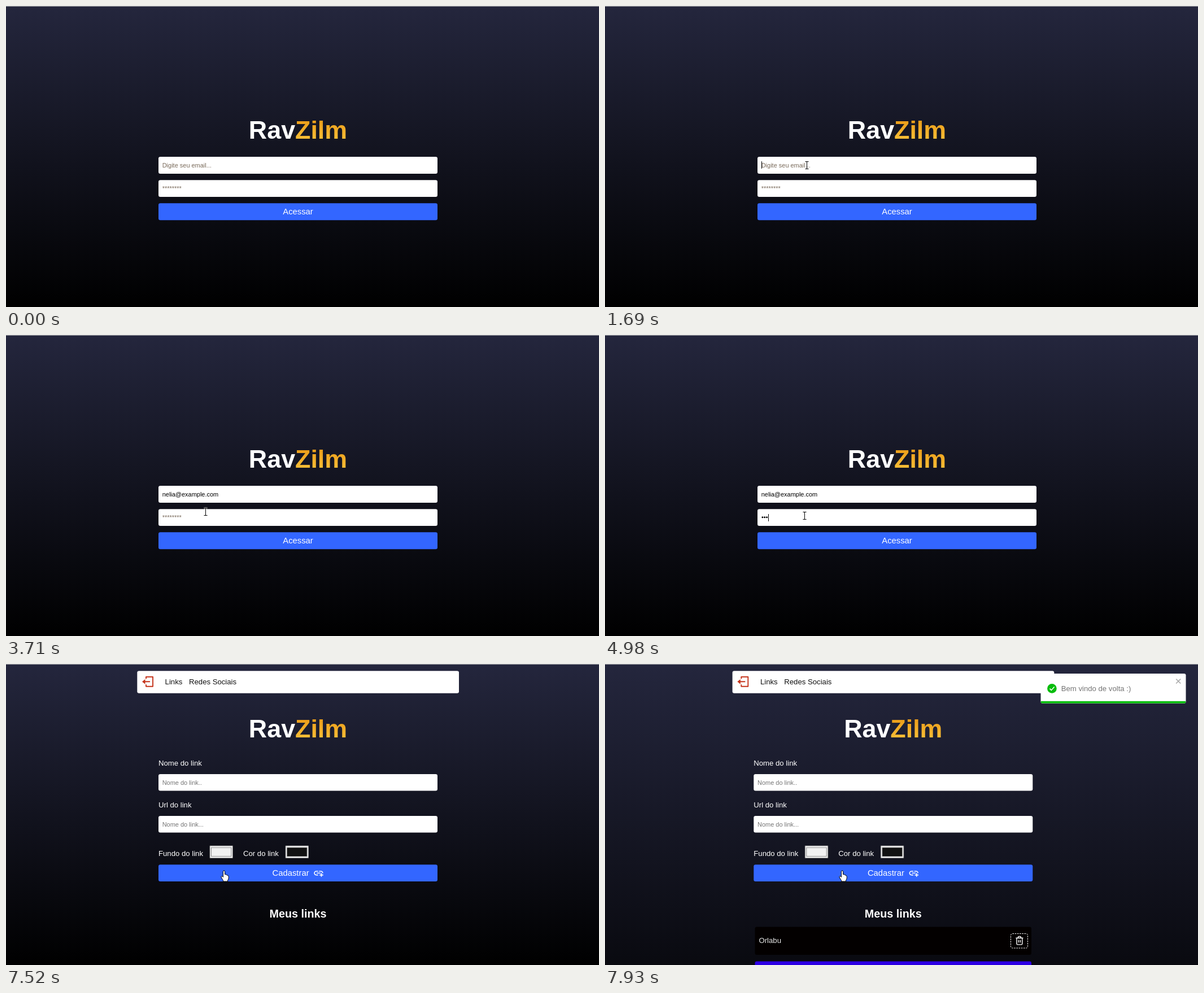
An HTML page with a canvas that plays this animation: 1050 by 533 pixels, repeating every 8 s.

```html
<!DOCTYPE html>
<html lang="pt-BR">
<head>
<meta charset="utf-8">
<title>RavZilm</title>
<style>
html, body { margin: 0; width: 100%; height: 100%; overflow: hidden; background: #000; }
canvas { display: block; }
</style>
</head>
<body>
<canvas id="stage" width="1050" height="533"></canvas>
<script>
const ctx = document.getElementById('stage').getContext('2d');
const W = 1050, H = 533, LOOP = 8000, STEP = 68;
const FAMILY = '"Liberation Sans", Arial, sans-serif';
const SMALL = 10.97, BODY = 13.17, BUTTON = 14.8;
const EMAIL = 'nelia@example.com';

// Pointer tracks: [ms, x, y], held between screen refreshes
const TRACKS = [
  [[200, 1001, 521], [400, 760, 450], [600, 560, 385], [750, 455, 347],
   [880, 399, 324], [950, 376, 308], [1020, 366, 295], [1220, 355, 280]],
  [[1620, 359, 276], [1690, 357, 282], [1750, 355, 280]],
  [[3440, 355, 286], [3576, 354, 306], [3712, 353, 319.5]],
  [[6150, 354, 323], [6350, 370, 346], [6558, 386, 366]],
  [[7520, 386, 366], [7792, 386, 366], [7928, 420, 366]]
];
const KEYSTROKES = [4380, 4710, 4980, 5510, 5770, 6080];
const EMAIL_CARET = [[1690, 2210], [2740, 3370]];
const PASS_CARET = [[3780, 4310], [4380, 6570]];

const ICONS = {
  hand: new Path2D('M-1.6 1.6a1.6 1.6 0 0 1 3.2 0V6.6Q4.2 6 4.4 7.6Q6.6 7.2 6.6 8.8Q8.4 8.8 8.2 10.6V13Q8 15.5 6.6 17V19H-1.2Q-1.4 17 -2.6 15.4L-4.8 12Q-5.4 9.6 -3.8 9.6Q-2.8 9.8 -1.6 11.4Z'),
  arrow: new Path2D('M0 0V16L3.7 12.6L6 18L8.4 17L6.1 11.7H11Z'),
  link: new Path2D('M8 11h8v2H8zM20.1 12H22c0-2.76-2.24-5-5-5h-4v1.9h4c1.71 0 3.1 1.39 3.1 3.1zM3.9 12c0-1.71 1.39-3.1 3.1-3.1h4V7H7c-2.76 0-5 2.24-5 5s2.24 5 5 5h4v-1.9H7c-1.71 0-3.1-1.39-3.1-3.1zM19 12h-2v3h-3v2h3v3h2v-3h3v-2h-3z'),
  exit: new Path2D('M7 5V1.5H19V18.5H7V15M14 10H4'),
  exitTip: new Path2D('M0 10L5.5 5.6V14.4Z'),
  trash: new Path2D('M0 3H13M1.6 3V13.2Q1.6 14.6 3 14.6H10Q11.4 14.6 11.4 13.2V3M4 3V1.4Q4 .2 5 .2H8Q9 .2 9 1.4V3M5 6.5V11M8 6.5V11')
};

const within = (t, spans) => spans.some(([a, b]) => t >= a && t < b);

function text(str, x, y, size, color, opts = {}) {
  ctx.font = `${opts.bold ? 'bold ' : ''}${size}px ${FAMILY}`;
  ctx.textAlign = opts.align || 'left';
  ctx.fillStyle = color;
  ctx.fillText(str, x, y);
  return ctx.measureText(str).width;
}

function box(x, y, w, h, color, r = 3.3) {
  ctx.beginPath();
  ctx.roundRect(x, y, w, h, r);
  ctx.fillStyle = color;
  ctx.fill();
}

function line(points, color, width) {
  ctx.beginPath();
  points.forEach(([x, y], i) => i ? ctx.lineTo(x, y) : ctx.moveTo(x, y));
  ctx.strokeStyle = color;
  ctx.lineWidth = width;
  ctx.stroke();
}

function icon(path, x, y, { fill, stroke, width = 1, scale = 1 }) {
  ctx.save();
  ctx.translate(x, y);
  ctx.scale(scale, scale);
  ctx.lineJoin = 'round';
  ctx.lineWidth = width;
  if (fill) { ctx.fillStyle = fill; ctx.fill(path); }
  if (stroke) { ctx.strokeStyle = stroke; ctx.stroke(path); }
  ctx.restore();
}

function background(height) {
  const g = ctx.createLinearGradient(0, 0, 0, height);
  g.addColorStop(0, '#24263d');
  g.addColorStop(1, '#000');
  ctx.fillStyle = g;
  ctx.fillRect(0, 0, W, H);
  ctx.fillStyle = '#a3a4a9';
  ctx.fillRect(0, 0, W, 1);
}

function brand(center, y) {
  const size = 44.8;
  ctx.font = `bold ${size}px ${FAMILY}`;
  const head = ctx.measureText('Rav').width, tail = ctx.measureText('Zilm').width;
  const x = center - (head + tail) / 2;
  const g = ctx.createLinearGradient(0, y - 36, 0, y + 8);
  g.addColorStop(0, '#ea9a16');
  g.addColorStop(1, '#fac43c');
  text('Rav', x, y, size, '#fff', { bold: true });
  text('Zilm', x + head, y, size, g, { bold: true });
}

function caret(x, y) {
  ctx.fillStyle = '#000';
  ctx.fillRect(Math.round(x), y, 1, 13);
}

function login(t) {
  background(H);
  brand(517, 235);
  box(270, 267, 494, 30, '#fff');
  box(270, 308.3, 494, 29.7, '#fff');
  box(270, 349.3, 494, 29.9, '#36f');
  text('Acessar', 517, 369, BUTTON, '#fff', { align: 'center' });

  let end = 277;
  if (t < 2870) text('Digite seu email...', 276.7, 286, SMALL, '#796a5a');
  else end += text(EMAIL, 276.7, 286, SMALL, '#000');
  if (within(t, EMAIL_CARET)) caret(end, 275);

  const typed = KEYSTROKES.filter(k => t >= k).length;
  if (!typed) text('********', 276.7, 327, SMALL, '#796a5a');
  for (let i = 0; i < typed; i++) {
    ctx.beginPath();
    ctx.arc(278.9 + i * 3.84, 322.8, 1.5, 0, 7);
    ctx.fillStyle = '#000';
    ctx.fill();
  }
  if (within(t, PASS_CARET)) caret(277 + typed * 3.84, 317);
}

function swatch(x, color) {
  box(x, 321.5, 41.4, 22.6, '#767676', 1);
  box(x + 0.8, 322.3, 39.8, 21, '#efefef', 0);
  box(x + 2.6, 324.8, 36.2, 16.2, '#777', 0);
  box(x + 3.4, 325.6, 34.6, 14.6, color, 0);
}

function linkCards() {
  box(265.5, 465.5, 489.5, 49.5, '#030000');
  text('Orlabu', 272.5, 494, BODY, '#e8e8e8');
  ctx.beginPath();
  ctx.roundRect(718.5, 477.5, 30, 25.5, 3);
  ctx.setLineDash([2.6, 1.6]);
  ctx.strokeStyle = '#fff';
  ctx.lineWidth = 1;
  ctx.stroke();
  ctx.setLineDash([]);
  icon(ICONS.trash, 727.4, 482.3, { stroke: '#fff', width: 1.4 });
  box(265.5, 526.5, 489.5, 50, '#2c00e4');
}

function panel(loaded) {
  background(loaded ? 720 : H);
  ctx.save();
  ctx.translate(loaded ? -6.7 : 0, 0);
  box(232.3, 12.3, 569.7, 39.5, '#fff');
  icon(ICONS.exit, 241, 21.3, { stroke: '#c5341c', width: 1.9 });
  icon(ICONS.exitTip, 241, 21.3, { fill: '#c5341c' });
  text('Links', 281.6, 36, BODY, '#121212');
  text('Redes Sociais', 324, 36, BODY, '#121212');
  brand(517, 130);
  text('Nome do link', 270, 180, BODY, '#fff');
  box(270, 195, 494, 29.6, '#fff');
  text('Nome do link..', 276.7, 214, SMALL, '#757575');
  text('Url do link', 270, 254, BODY, '#fff');
  box(270, 269, 494, 29.6, '#fff');
  text('Nome do link...', 276.7, 288, SMALL, '#757575');
  text('Fundo do link', 270, 340, BODY, '#fff');
  swatch(360.5, '#f1f1f1');
  text('Cor do link', 420, 340, BODY, '#fff');
  swatch(494.6, '#121212');
  box(270, 355.2, 494, 29.8, '#36f');
  text('Cadastrar', 471.6, 375, BUTTON, '#fff');
  icon(ICONS.link, 543.6, 360.4, { fill: '#fff', scale: 0.823 });
  text('Meus links', 517, 449, 19.75, '#fff', { bold: true, align: 'center' });
  ctx.restore();
  if (loaded) linkCards();
}

function toast(now) {
  if (now < 7617) return;
  const left = 1 - (now - 7617) / 420;
  ctx.save();
  ctx.translate(728 + 2490 * left ** 3, 0);
  ctx.beginPath();
  ctx.roundRect(0, 17, 257, 52.8, 3.3);
  ctx.fillStyle = '#fff';
  ctx.fill();
  ctx.clip();
  ctx.fillStyle = '#07bc0c';
  ctx.fillRect(0, 65.8, 257, 4);
  ctx.beginPath();
  ctx.arc(19.9, 43.4, 8.3, 0, 7);
  ctx.fill();
  line([[16, 43.6], [18.8, 46.4], [24, 40.6]], '#fff', 1.5);
  text('Bem vindo de volta :)', 36.2, 48, BODY, '#757575');
  line([[239.7, 26.5], [247.7, 34.5]], '#aaa', 1.7);
  line([[247.7, 26.5], [239.7, 34.5]], '#aaa', 1.7);
  ctx.restore();
}

const snap = (t, start) => start + Math.floor((t - start) / STEP) * STEP;

function pointerAt(t) {
  const track = TRACKS.filter(k => t >= k[0][0]).pop();
  const now = snap(t, track[0][0]);
  const i = track.findIndex(k => k[0] > now);
  if (i < 0) return track[track.length - 1].slice(1);
  const [t0, x0, y0] = track[i - 1], [t1, x1, y1] = track[i];
  const p = (now - t0) / (t1 - t0);
  return [x0 + (x1 - x0) * p, y0 + (y1 - y0) * p];
}

function beam(x, y) {
  const cx = Math.floor(x) + 0.5, top = Math.round(y) - 6.5, low = top + 13;
  for (const [color, width] of [['rgba(255,255,255,.8)', 2.4], ['#000', 1]]) {
    line([[cx, top], [cx, low]], color, width);
    for (const edge of [top, low]) line([[cx - 3, edge], [cx + 3, edge]], color, width);
  }
}

function pointer(t) {
  if (t < 200) return;
  const [x, y] = pointerAt(t);
  const over = x > 270 && x < 764;
  if (over && y > 349 && y < 379) icon(ICONS.hand, x, y, { fill: '#fff', stroke: '#000' });
  else if (over && y > 267 && y < 349) beam(x, y);
  else icon(ICONS.arrow, x, y, { fill: '#fff', stroke: '#000' });
}

function draw(t) {
  ctx.clearRect(0, 0, W, H);
  if (t < 7520) {
    login(t);
  } else {
    panel(t >= 7660);
    toast(snap(t, 7520));
  }
  pointer(t);
}

const start = performance.now();
function tick(now) {
  draw(Math.max(0, now - start) % LOOP);
  requestAnimationFrame(tick);
}
draw(0);
requestAnimationFrame(tick);
</script>
</body>
</html>
```
